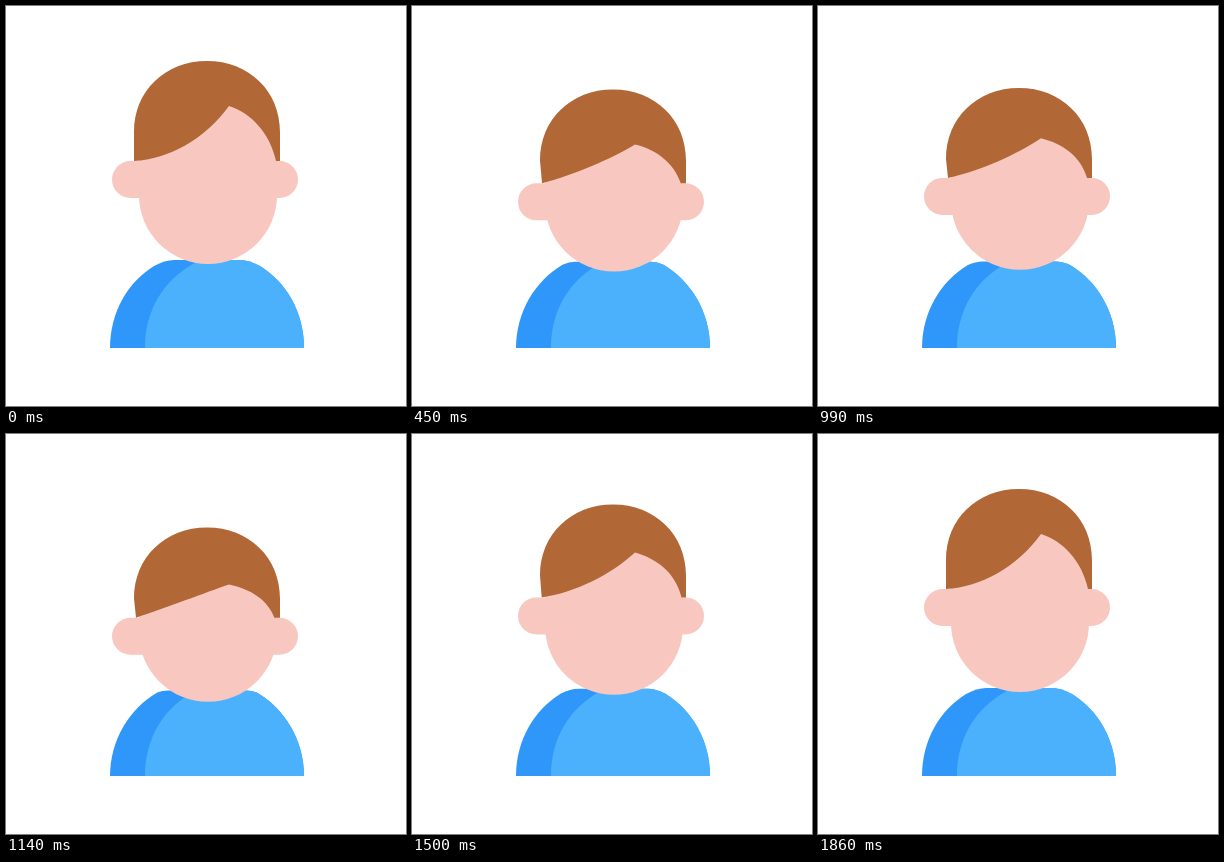
Recreate the animation shown at these times as an HTML page. Size 400 px wide and 400 px high, loop 2.07 s.

```html
<!DOCTYPE html>
<html lang="en">
<head>
<meta charset="utf-8">
<title>Nodding head</title>
<style>
  html, body { margin: 0; width: 100%; height: 100%; overflow: hidden; background: #fff; }
  svg { display: block; width: 100%; height: 100%; }
  .skin { fill: #f8c7c0; }
  .hair { fill: #b16836; }
  .shirt { fill: #4bb1fd; }
  .shade { fill: #3097fa; }
</style>
</head>
<body>
<svg viewBox="0 0 400 400">
  <clipPath id="bodyClip"><path id="body"/></clipPath>
  <g clip-path="url(#bodyClip)">
    <rect class="shade" x="100" y="240" width="200" height="104"/>
    <path class="shirt" d="M139 342C139 305 157 274 189 257L200 250H300V344H139Z"/>
  </g>
  <rect class="skin" id="ears" x="106" width="186" height="37" rx="18.5"/>
  <rect class="skin" id="face" x="133" width="138" rx="69" ry="69"/>
  <path class="hair" id="hair"/>
</svg>
<script>
  const LOOP = 2070, STEP = 30;
  const $ = id => document.getElementById(id);
  const [body, ears, face, hair] = ['body', 'ears', 'face', 'hair'].map($);

  // Vertical offsets from the rest pose: [time, offset]
  const headKeys = [[0, 0], [200, -3], [615, 35.5], [960, 16.5], [1280, 37], [1630, -4], [1860, 0]];
  const crownKeys = [[0, 0], [200, -3], [615, 45], [960, 26.5], [1280, 46.5], [1670, -5], [1860, 0]];
  const partKeys = [[0, 0], [200, -2], [615, 59.5], [960, 31.5], [1280, 63.5], [1650, -6], [1860, 0]];

  const mix = (a, b, k) => a + (b - a) * k;

  function track(keys, t) {
    const i = keys.findIndex(key => key[0] > t);
    if (i < 0) return keys[keys.length - 1][1];
    const [t0, v0] = keys[i - 1], [t1, v1] = keys[i];
    return mix(v0, v1, (1 - Math.cos(Math.PI * (t - t0) / (t1 - t0))) / 2);
  }

  function bodyPath(k) {
    const top = mix(254, 257, k), joinY = mix(260, 258, k);
    const joinX = mix(148, 152, k), flatX = mix(168, 160, k);
    const c1 = mix(122, 124, k), c2 = mix(276, 274, k), bend = mix(159, 156, k);
    const flip = x => 402 - x;
    return `M104 342C104 306 ${c1} ${c2} ${joinX} ${joinY}Q${bend} ${top} ${flatX} ${top}` +
      `H${flip(flatX)}Q${flip(bend)} ${top} ${flip(joinX)} ${joinY}` +
      `C${flip(c1)} ${c2} 298 306 298 342Z`;
  }

  function hairPath(head, top, part, k) {
    const end = 155 + head, side = top + 71;
    const left = 128 + 2 * Math.min(1, Math.max(0, head / 10));
    return `M${left} ${end}L128 ${side}C128 ${top + 30} 159 ${top} 201 ${top}` +
      `C243 ${top} 274 ${top + 30} 274 ${side}V${end}H${mix(270, 268, k)}` +
      `C${mix(264, 261, k)} ${end - mix(28, 15, k)} 245 ${part + mix(7, 4, k)} 223 ${part}` +
      `C199 ${133 + 0.9 * head} 163 ${153 + 0.69 * head} ${left} ${end}Z`;
  }

  function draw(now) {
    const t = Math.floor(now % LOOP / STEP) * STEP;
    const head = track(headKeys, t), k = head / 36;
    const top = 55 + track(crownKeys, t), part = 100 + track(partKeys, t);
    const faceTop = top + 20;
    body.setAttribute('d', bodyPath(k));
    ears.setAttribute('y', 155 + head);
    face.setAttribute('y', faceTop);
    face.setAttribute('height', 258 + 0.34 * head - faceTop);
    hair.setAttribute('d', hairPath(head, top, part, k));
  }

  let start;
  function tick(now) {
    start ??= now;
    draw(now - start);
    requestAnimationFrame(tick);
  }
  draw(0);
  requestAnimationFrame(tick);
</script>
</body>
</html>
```
